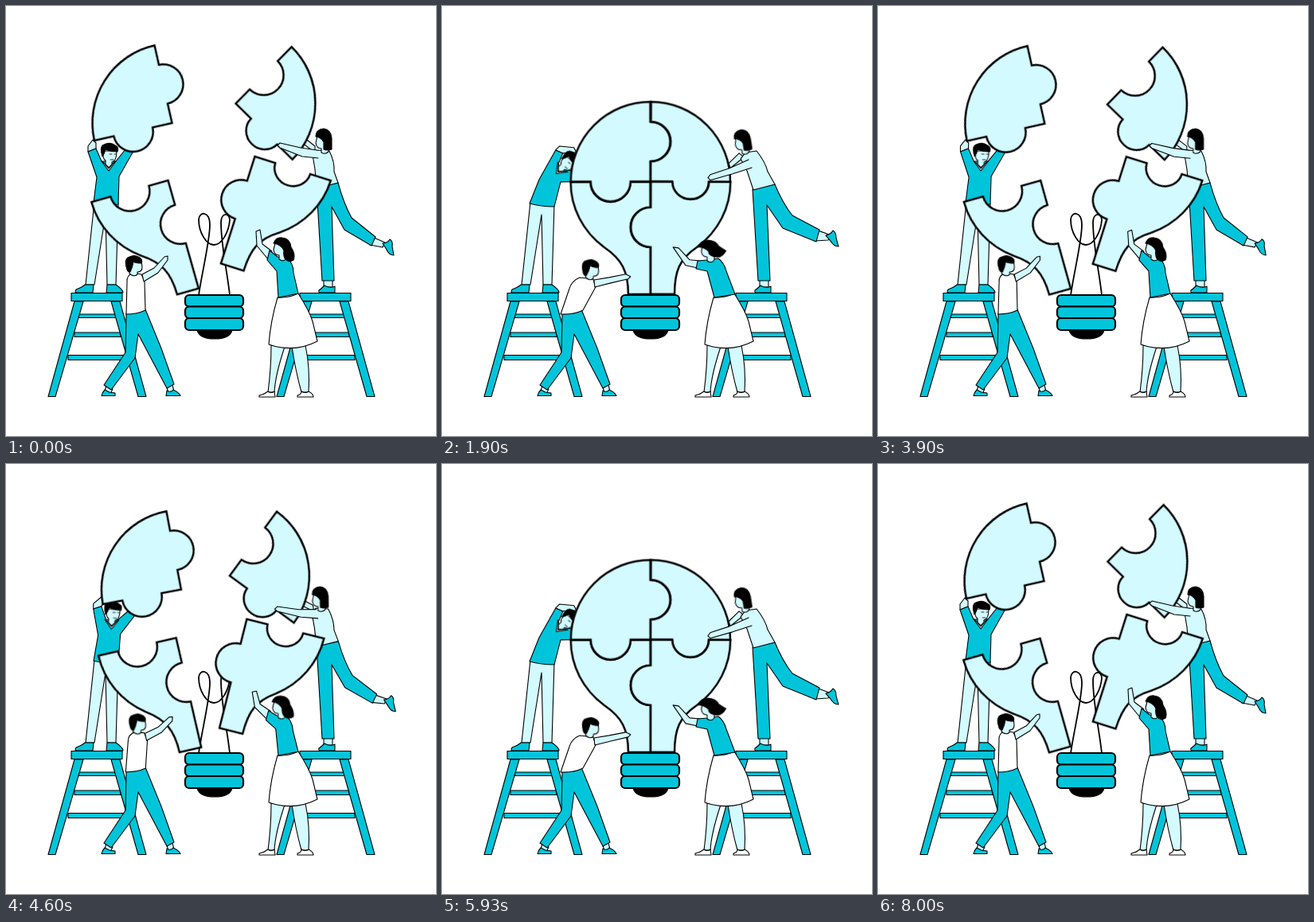
Write an HTML page that moves like this. It is 540x540 px and loops after 8030 ms.

```html
<!DOCTYPE html>
<html lang="en">
<head>
<meta charset="utf-8">
<title>Building a light bulb</title>
<style>
html, body { margin: 0; width: 100%; height: 100%; overflow: hidden; background: #fff; }
svg { display: block; width: 100vw; height: 100vh; }
g, path, ellipse, rect { stroke-linejoin: round; stroke-linecap: round; }
.teal { fill: #00c5da; }
.pale { fill: #d2faff; }
.white { fill: #fff; }
.ink { fill: #000; }
.line { fill: none; }
.piece { fill: #d2faff; stroke-width: 2.5; stroke-linejoin: miter; }

/* --a apart, --b halfway, --c joined, --e halfway back (defaults to --b) */
.move { animation: move 4.015s infinite; }
.pose { animation: pose 4.015s infinite; }
@keyframes move {
  0%, 100% { transform: var(--a); animation-timing-function: cubic-bezier(.47, 0, .745, .715); }
  27.8% { transform: var(--b); animation-timing-function: cubic-bezier(.39, .575, .565, 1); }
  50.5% { transform: var(--c); }
  63.8% { transform: var(--c); animation-timing-function: cubic-bezier(.47, 0, .745, .715); }
  82.6% { transform: var(--e, var(--b)); animation-timing-function: cubic-bezier(.39, .575, .565, 1); }
}
@keyframes pose {
  0%, 100% { d: var(--a); animation-timing-function: cubic-bezier(.47, 0, .745, .715); }
  27.8% { d: var(--b); animation-timing-function: cubic-bezier(.39, .575, .565, 1); }
  50.5% { d: var(--c); }
  63.8% { d: var(--c); animation-timing-function: cubic-bezier(.47, 0, .745, .715); }
  82.6% { d: var(--b); animation-timing-function: cubic-bezier(.39, .575, .565, 1); }
}
</style>
</head>
<body>
<svg viewBox="0 0 540 540" stroke="#000" stroke-width="1.1">
  <!-- ladders -->
  <g id="ladder" class="teal">
    <path d="M91 387H138V391.500H91ZM86 410H144V415.500H86ZM78 438.500H151V444.500H78Z"/>
    <path d="M86 371H97L62 490.500H53ZM132 371H143L176 490.500H166Z"/>
    <path d="M82 360.500H146V370.500H82Z"/>
  </g>
  <use href="#ladder" x="287"/>

  <!-- filament -->
  <path class="line" stroke-width="1.8" d="M242 363C246 335 256 295 256 275C256 258 243 257 242 268C242 285 252 300 261 300C272 300 280 282 281 269C281 259 270 259 270 272C270 300 278 335 281 363"/>

  <!-- man, upper left -->
  <g>
    <path class="pale" d="M111 246L100 350H111L125 262L127 350H138L141 248Z"/>
    <path class="teal" d="M99 350Q96 353 88 356Q86 360 88 360H109L110 350ZM127 350L126 360H147Q147 356 138 350Z"/>
    <path class="pose pale" style="
      --a:path('M103 183L103 176L109 168L113 172L113 179Z');
      --b:path('M124 180L124 174L143 164L147 172L134 178Z');
      --c:path('M143 181L148 176L166 178L169 184L152 185Z')"/>
    <path class="pose teal" style="
      --a:path('M110 247L114 215L103 183L113 179L120 195L138 195L150 180L159 184L142 214L141 249Q125 251 110 247Z');
      --b:path('M110 248L119 215L124 180L134 178L137 195L146 197L166 190L173 196L147 213L141 250Q125 252 110 248Z');
      --c:path('M110 248L122 218L143 181L152 185L146 199L148 205L163 207L163 221L149 221L141 252Q125 252 110 248Z')"/>
    <g class="move" style="
      --a:translate(129px,202px) rotate(0deg);
      --b:translate(140px,203px) rotate(8deg);
      --c:translate(147px,207px) rotate(45deg)">
      <path class="white" d="M-9 -7L0 5L9 -7L5 -4L0 2L-5 -4Z"/>
      <path class="pale" d="M-7 -20Q-8 -10 -4 -8V-3L0 1L4 -3V-6Q10 -7 10 -20Z"/>
      <path class="ink" d="M-8 -13Q-12 -26 -6 -28Q2 -32 8 -27Q13 -25 11 -19Q2 -19 -4 -22Q-5 -17 -8 -13Z"/>
      <path class="line" stroke-width=".8" d="M1 -16H4M7 -16H9M2 -9H6"/>
    </g>
  </g>

  <!-- woman, upper right: far arm -->
  <path class="pose pale" style="
    --a:path('M374 165L388 176L388 184L372 172Z');
    --b:path('M363 179L380 180L384 187L363 187Z');
    --c:path('M360 198L373 185L379 190L362 204Z')"/>

  <path class="move piece" d="M0 0H-25A25 25 0 0 1 -75 0H-100C-100 32 -85 62 -58 82C-36 97 -28 112 -28 141H0V82A25 25 0 0 1 0 32Z" style="
    --a:translate(203.500px,219px) rotate(-15.800deg);
    --b:translate(235px,217px) rotate(-6.9deg);
    --c:translate(262px,221px) rotate(0deg);
    --e:translate(234.500px,226px) rotate(-5.8deg)"/>
  <path class="move piece" d="M0 -100V-75A25 25 0 0 1 0 -25V0H-25A25 25 0 0 1 -75 0H-100A100 100 0 0 1 0 -100Z" style="
    --a:translate(208.500px,147px) rotate(-12.7deg);
    --b:translate(244px,180px) rotate(-6.3deg);
    --c:translate(262px,221px) rotate(0deg);
    --e:translate(246px,182px) rotate(-6.3deg)"/>
  <path class="move piece" d="M0 -100A100 100 0 0 1 100 0H73A23 22 0 0 1 27 0H0V-25A25 25 0 0 0 0 -75Z" style="
    --a:translate(288.500px,122.500px) rotate(44.6deg);
    --b:translate(265px,178px) rotate(18.6deg);
    --c:translate(262px,221px) rotate(0deg);
    --e:translate(266px,173px) rotate(20.8deg)"/>

  <!-- woman, upper right -->
  <g>
    <path class="pose pale" style="
      --a:path('M460 290L476 297L473 303L457 300Z');
      --b:path('M465 288L483 291L480 297L463 298Z');
      --c:path('M470 281L489 288L485 294L468 295Z')"/>
    <path class="pose teal" style="
      --a:path('M473 298Q479 298 482 293Q486 295 485 302L487 313Q481 313 478 306Z');
      --b:path('M478 292Q484 291 487 286Q491 288 490 295L494 306Q488 307 484 300Z');
      --c:path('M482 288Q488 287 491 282Q495 284 495 291L498 302Q492 302 488 295Z')"/>
    <path class="pale" d="M399 343H410V353H399Z"/>
    <path class="teal" d="M400 351Q396 355 393 357Q392 360 395 360H413V352Q407 355 400 351Z"/>
    <path class="pose teal" style="
      --a:path('M390 228L417 222Q424 248 434 266L464 290L459 301L425 281L409 252L412 345L397 345Z');
      --b:path('M390 229L418 224Q426 248 437 264L469 287L463 299L427 280L409 252L412 345L397 345Z');
      --c:path('M390 230L418 224Q428 248 440 263L474 281L470 296L428 279L408 250L412 345L397 345Z')"/>
    <path class="pose pale" style="
      --a:path('M385 187L390 181L406 182Q413 196 412 208L417 222L390 229L388 205Z');
      --b:path('M382 188L387 181L402 182Q410 196 412 210L418 224L390 230L386 206Z');
      --c:path('M375 192L381 184L395 182Q406 196 409 208L418 224L391 231L383 207Z')"/>
    <path class="pose pale" style="
      --a:path('M390 181L370 178L344 172L341 175L344 178L372 189L392 191');
      --b:path('M388 186L362 193L334 194L330 197L334 200L367 199L391 200');
      --c:path('M385 193L361 204L337 212L334 216L337 219L365 211L389 203')"/>
    <g class="move" style="
      --a:translate(399px,184px) rotate(0deg);
      --b:translate(386px,184px) rotate(-2deg);
      --c:translate(380px,185px) rotate(-9deg)">
      <path class="pale" d="M-8 -21L-10 -12Q-9 -5 -3 -5V0Q2 3 6 -1V-20Z"/>
      <path class="ink" d="M-10 -20Q-10 -29 0 -30Q9 -29 10 -18L10 -4Q4 -2 0 -4L0 -13Q-3 -19 -10 -20Z"/>
    </g>
  </g>

  <path class="move piece" d="M0 0H27A23 22 0 0 0 73 0H100C100 32 85 62 58 82C36 97 30 112 30 141H0V82A25 25 0 0 1 0 32Z" style="
    --a:translate(312.500px,189px) rotate(17.600deg);
    --b:translate(281px,207px) rotate(6.700deg);
    --c:translate(262px,221px) rotate(0deg);
    --e:translate(285px,203px) rotate(7.600deg)"/>

  <!-- socket -->
  <path class="ink" d="M240 407H284C282 415 274 418 262 418C250 418 242 415 240 407Z"/>
  <g class="teal" stroke-width="2.2">
    <rect x="225" y="363" width="73" height="14.500" rx="5"/>
    <rect x="225" y="377.500" width="73" height="14.500" rx="5"/>
    <rect x="225" y="392" width="73" height="15" rx="5"/>
  </g>

  <!-- man, lower left -->
  <g>
    <path class="pale" d="M126 476L124 484L131 487L134 481ZM202 479L204 486L211 484L209 476Z"/>
    <path class="teal" d="M124 482Q121 485 120 489.500H137V486L130 485ZM202 483L201 489.500H219Q217 485 210 482Q207 486 202 483Z"/>
    <path class="teal" d="M151 386L150 435L123 476L132 482L162 442L166 412L202 480L211 475L195 430L175 381Z"/>
    <path class="pose white" style="
      --a:path('M151 387L152 347Q151 338 160 335L170 337L174 346L175 382Q165 387 151 387Z');
      --b:path('M149 386L156 352Q158 343 166 340L181 339L185 350L176 382Q165 387 149 386Z');
      --c:path('M149 387L160 355Q163 345 173 341L190 343L193 353L177 382Q165 388 149 387Z')"/>
    <path class="pose pale" style="
      --a:path('M171 337L186 329L199 315L203 314L203 319L191 335L173 346Z');
      --b:path('M182 341L201 334L217 324L222 325L221 330L205 341L184 350Z');
      --c:path('M191 344L210 341L231 337L237 340L234 343L212 348L192 353Z')"/>
    <g class="move" style="
      --a:translate(161px,340px) rotate(0deg);
      --b:translate(175px,341px) rotate(0deg);
      --c:translate(186px,345px) rotate(4deg)">
      <path class="pale" d="M-6 -20V-4Q0 1 4 -3V-6Q10 -6 10 -12L9 -21Z"/>
      <path class="ink" d="M-9 -9Q-13 -20 -8 -24Q0 -29 7 -24Q11 -21 9 -17Q2 -17 -1 -19Q-2 -12 -5 -6Q-8 -6 -9 -9Z"/>
    </g>
  </g>

  <!-- woman, lower right -->
  <g>
    <path class="pale" d="M333 426Q333 455 329 485H337Q338 464 350 428ZM359 428Q364 460 371 485H380Q382 455 376 426Z"/>
    <path class="white" d="M329 484Q324 488 318 489V491H338L337 484Q333 487 329 484ZM371 484Q371 488 366 489V491H386Q386 487 380 484Q376 487 371 484Z"/>
    <path class="white" d="M341 366Q354 367 367 361Q381 383 385 396L391 421Q362 436 330 425Q332 397 341 366Z"/>
    <path class="pose pale" style="
      --a:path('M314 283L319 281L322 299L334 308L329 318L315 301Z');
      --b:path('M299 293L305 294L313 307L329 316L325 326L307 315Z');
      --c:path('M290 303L297 304L311 319L324 320L321 329L306 326Z')"/>
    <path class="pose teal" style="
      --a:path('M331 307L341 315L352 316Q361 322 361 335L367 361L342 366L340 333L328 319Z');
      --b:path('M327 316L338 318L349 317Q357 322 359 335L367 362L342 366L336 332L323 327Z');
      --c:path('M321 320L333 319L347 317Q354 322 357 333L368 362L342 366L333 333L319 330Z')"/>
    <g class="move" style="
      --a:translate(346px,320px) rotate(0deg);
      --b:translate(342px,321px) rotate(0deg);
      --c:translate(336px,322px) rotate(-2deg)">
      <path class="pale" d="M-8 -22L-10 -14Q-9 -7 -3 -7V-2Q2 2 6 -3V-20Z"/>
      <path class="pose ink" style="
        --a:path('M-10 -22Q-7 -30 1 -29Q11 -28 12 -17Q18 -8 15 -1Q9 3 4 -3Q2 -8 3 -13Q-1 -21 -10 -22Z');
        --b:path('M-12 -21Q-9 -29 0 -29Q11 -29 12 -19Q16 -14 18 -7Q11 -3 5 -6Q0 -9 0 -14Q-3 -20 -12 -21Z');
        --c:path('M-14 -20Q-10 -28 -1 -28Q9 -27 12 -20Q16 -17 21 -14Q15 -4 6 -7Q-1 -9 -1 -14Q-5 -19 -14 -20Z')"/>
    </g>
  </g>
</svg>
</body>
</html>
```
